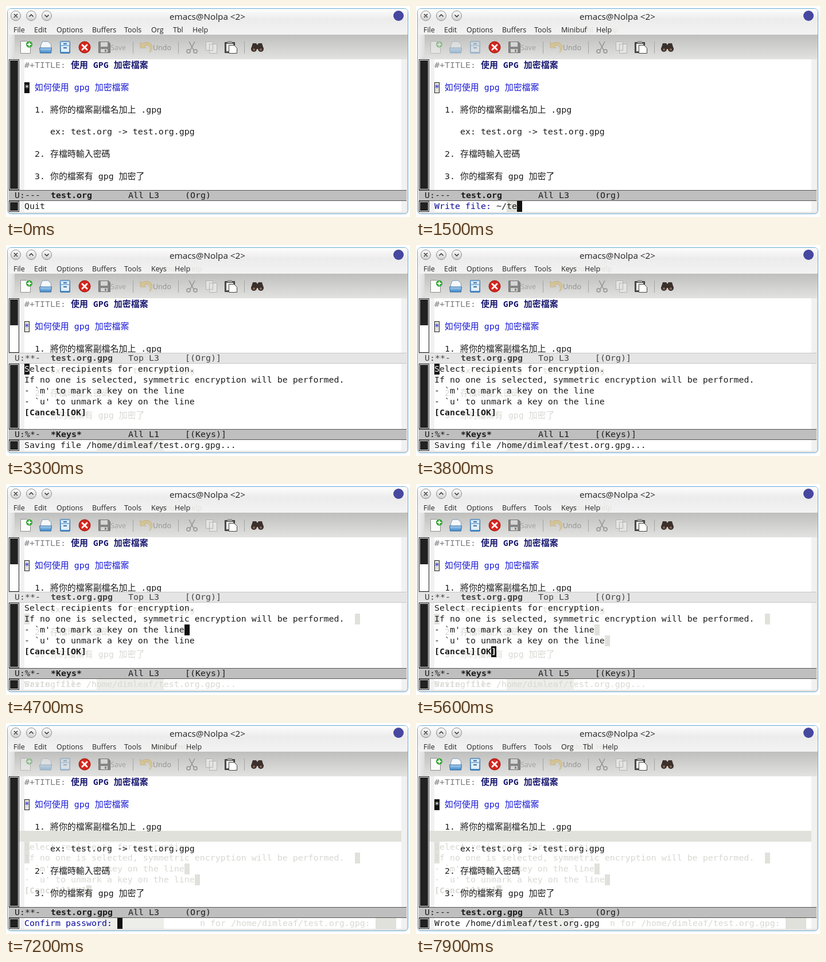
Animation of 704 by 368 pixels, one loop 8000 ms. Source, as an HTML page:

```html
<!DOCTYPE html>
<html lang="zh-Hant">
<head>
<meta charset="utf-8">
<title>GPG in Emacs</title>
<style>
html, body { margin: 0; width: 100%; height: 100%; overflow: hidden; background: #fff; }
svg { display: block; width: 704px; height: 368px; }
text { white-space: pre; }
.mono { font: 300 14.95px "DejaVu Sans Mono", "Noto Sans CJK TC", "Noto Sans CJK", monospace; fill: #1c1c1c; }
.ui { font: 12.5px "Open Sans", "Noto Sans", sans-serif; fill: #222; }
.b { font-weight: bold; }
.key { fill: #7f7f7f; }
.title { fill: #191970; font-weight: bold; }
.head { fill: #1a1ad6; }
.prompt { fill: #0c0c9c; }
.inv { fill: #fff; }
.idle { fill: #444; }
.old .mono { fill: #d8d8d3; }
.old .ui { fill: #e0e0db; }
</style>
</head>
<body>
<svg viewBox="0 0 704 368">
  <defs>
    <linearGradient id="bar" x2="0" y2="1">
      <stop offset="0" stop-color="#fdfdfd"/><stop offset=".4" stop-color="#ececec"/>
      <stop offset="1" stop-color="#f3f3f3"/>
    </linearGradient>
    <linearGradient id="tools" x2="0" y2="1">
      <stop offset="0" stop-color="#bfbfbd"/><stop offset="1" stop-color="#e2e2e0"/>
    </linearGradient>
    <linearGradient id="edge">
      <stop offset="0" stop-color="#f0f0f0"/><stop offset="1" stop-color="#dcdcdc"/>
    </linearGradient>
    <linearGradient id="knob" x2="0" y2="1">
      <stop offset="0" stop-color="#fff"/><stop offset="1" stop-color="#cfcfcf"/>
    </linearGradient>
    <linearGradient id="blue" x2="0" y2="1">
      <stop offset="0" stop-color="#a9d2f3"/><stop offset="1" stop-color="#3d83c4"/>
    </linearGradient>
  </defs>

  <rect x="2.5" y="4.5" width="698" height="358" rx="6" fill="#e4e4e4" stroke="#68acd6"/>
  <rect x="3" y="5" width="697" height="46" rx="5" fill="url(#bar)"/>
  <rect x="3" y="50" width="12" height="43" fill="url(#edge)"/>
  <rect x="15" y="50" width="685" height="43" fill="url(#tools)"/>

  <g fill="url(#knob)" stroke="#8c8c8c">
    <circle cx="17" cy="17" r="8.5"/><circle cx="44" cy="17" r="8.5"/><circle cx="71" cy="17" r="8.5"/>
  </g>
  <path d="M14 14l6 6m0-6l-6 6M40.5 18.5l3.5-3.5 3.5 3.5M67.5 15.5l3.5 3.5 3.5-3.5" fill="none" stroke="#333" stroke-width="1.5"/>
  <text class="ui" x="351" y="23.5" text-anchor="middle" style="font-size:15.25px">emacs@Nolpa &lt;2&gt;</text>
  <circle cx="684" cy="17" r="9" fill="#46479f"/>

  <g id="files">
    <path d="M25.5 61.5h11l6 6v15h-17z" fill="#fbfbfb" stroke="#8d8d8d"/>
    <circle cx="40.5" cy="67" r="5.5" fill="#35a335"/>
    <path d="M37 67h7m-3.5-3.5v7" stroke="#fff" stroke-width="2"/>
    <path d="M60.5 80v-11l3-7h10l5 5v13z" fill="#f5f8fb" stroke="#7f97ad"/>
    <path d="M58.5 73h21l-1 9h-19z" fill="url(#blue)" stroke="#346b9f"/>
    <rect x="94.5" y="61.5" width="17" height="21" rx="1.5" fill="url(#blue)" stroke="#4378a9"/>
    <path d="M96 64h14v4H96zM96 70h14v10H96z" fill="#e1effa"/>
    <path d="M100 66h6m-6 7h6" stroke="#3b6e9e" stroke-width="2"/>
  </g>
  <circle cx="137" cy="72" r="10" fill="#d5261d" stroke="#971009"/>
  <path d="M133 68l8 8m0-8l-8 8" stroke="#fff" stroke-width="3" stroke-linecap="round"/>
  <path d="M161.5 62.5h17l3 3v16h-20z" fill="#858585" stroke="#727272"/>
  <path d="M165 63h12v8h-12zM165 75h12v6h-12z" fill="#d5d5d5"/>
  <path d="M172 76h3v4h-3z" fill="#858585"/>
  <text class="ui" x="182" y="77" style="fill:#a2a2a2">Save</text>
  <g id="undo">
    <path d="M234 63v10h10l-3.5-3.5c6-3 11 0 11 8l-1.5 4c8-6 6-18-5-18-4 0-6 1-7.5 2.5z" fill="#e3b52a" stroke="#a8801a"/>
    <text class="ui" x="256" y="77" style="fill:#111">Undo</text>
  </g>
  <path d="M221.5 62v21M300.5 62v21M415.5 62v21" stroke="#a4a4a4"/>
  <g fill="none" stroke="#929292" stroke-width="1.5">
    <path d="M319 62l8 15M329 62l-8 15"/><circle cx="318" cy="79" r="3"/><circle cx="330" cy="79" r="3"/>
  </g>
  <g fill="#e4e4e3" stroke="#b4b4b2">
    <path d="M348.5 62.5h12v15h-12zM354.5 66.5h13v16h-13z"/>
  </g>
  <path d="M381.5 63.5h17v18h-17z" fill="#55554d" stroke="#333"/>
  <path d="M384 66h12v13h-12z" fill="#eee"/>
  <path d="M386 61h8v4h-8z" fill="#999"/>
  <path d="M388.5 68.5h9l5 5v9h-14z" fill="#fff" stroke="#444"/>
  <g fill="#3b302b">
    <path d="M430 65h6l2 3 2-3h6l3 10h-22z"/><circle cx="432" cy="75" r="5"/><circle cx="444" cy="75" r="5"/>
  </g>
  <g fill="#8b6a58"><circle cx="432" cy="76" r="2"/><circle cx="444" cy="76" r="2"/></g>

  <path d="M5 93h693v228H5zM5 340h693v19H5z" fill="#fff"/>
  <path d="M23 93h9v228h-9zM689 93h9v228h-9zM23 340h9v19h-9zM689 340h9v19h-9z" fill="#f1f1f1"/>
  <g id="live"></g>
</svg>
<script>
const LOOP = 8000, CELL = 9, LEFT = 32;
const USER = "/home/dimleaf/", FILE = "test.org.gpg";
const $ = id => document.getElementById(id);

const esc = s => s.replace(/&/g, "&amp;").replace(/</g, "&lt;").replace(/>/g, "&gt;");
const text = (x, y, s, cls = "") => `<text class="mono ${cls}" x="${x}" y="${y}">${esc(s)}</text>`;
const rect = (x, y, w, h, fill) => `<rect x="${x}" y="${y}" width="${w}" height="${h}" fill="${fill}"/>`;
const old = s => `<g class="old">${s}</g>`;
const PALE = "#e1e1dc";

const MENUS = {
  Org: [["Org", 253], ["Tbl", 291], ["Help", 325]],
  Minibuf: [["Minibuf", 253], ["Help", 314]],
  Keys: [["Keys", 253], ["Help", 294]]
};
const FIXED = [["File", 13], ["Edit", 49], ["Options", 88], ["Buffers", 150], ["Tools", 206]];
const labels = list => list.map(([s, x]) => `<text class="ui" x="${x}" y="46">${s}</text>`).join("");

const TAIL = [[224, "     ex: test.org -> test.org.gpg"], [263, "  2. 存檔時輸入密碼"], [302, "  3. 你的檔案有 gpg 加密了"]];
const tail = () => TAIL.map(([y, s]) => text(LEFT, y, s)).join("");

const KEYS = [
  "Select recipients for encryption.",
  "If no one is selected, symmetric encryption will be performed.",
  "- `m' to mark a key on the line",
  "- `u' to unmark a key on the line",
  "[Cancel][OK]"
];
const keyY = row => 221 + 19 * row;
const keyLines = () => KEYS.map((s, i) => text(LEFT, keyY(i), s, i == 4 ? "b" : "")).join("");
const keyCell = ([row, col], fill) => rect(LEFT + col * CELL, keyY(row) - 14, CELL, 19, fill);
// Places the cursor visits in the key list: row, column
const WALK = [[0, 0], [1, 0], [1, 64], [2, 31], [3, 33], [4, 12], [4, 11]];

function scrollbar(y, h, fill = h - 4) {
  return `<rect x="5.5" y="${y + .5}" width="17" height="${h - 1}" fill="#fff" stroke="#222"/>` +
    rect(7, y + 2, 14, fill, "#222");
}

function modeline(y, flags, name, place, mode, idle) {
  const cls = idle ? "idle" : "";
  return rect(5, y, 693, 19, idle ? "#e5e5e5" : "#bfbfbf") +
    `<path d="M5 ${y + .5}H698M5 ${y + 18.5}H698" stroke="${idle ? "#c6c6c6" : "#555"}"/>` +
    text(15, y + 14, "U:" + flags, cls) + text(78, y + 14, name, cls + " b") +
    text(213, y + 14, place, cls) + text(312, y + 14, mode, cls);
}

function orgBuffer(active) {
  const star = active ? rect(32, 133, 9, 19, "#111") + text(LEFT, 147, "*", "inv")
    : `<rect x="32.5" y="133.5" width="8" height="18" fill="${PALE}" stroke="#222"/>` + text(LEFT, 147, "*", "head");
  return text(LEFT, 108, "#+TITLE:", "key") + text(113, 108, "使用 GPG 加密檔案", "title") +
    star + text(50, 147, "如何使用 gpg 加密檔案", "head") + text(LEFT, 186, "  1. 將你的檔案副檔名加上 .gpg");
}

function minibuffer({ prompt = "", input = "" }) {
  const x = LEFT + prompt.length * CELL, end = x + input.length * CELL;
  return text(LEFT, 354, prompt, "prompt") + text(x, 354, input) +
    (prompt ? rect(end, 340, CELL, 19, "#111") : "");
}

const WRITE = { prompt: "Write file: ", input: "~/" };
const PASS = { prompt: `Passphrase for symmetric encryption for ${USER}${FILE}: `, input: "" };
const AGAIN = { prompt: "Confirm password: ", input: "" };
const SAVING = { input: `Saving file ${USER}${FILE}...` };
const typed = (mini, s) => ({ mini: { ...mini, input: mini.input + s } });
const typing = (mini, s, times) => times.map((t, i) => [t, typed(mini, s.slice(0, i + 1))]);

const steps = [
  [0, { menu: "Org", mini: { input: "Quit" }, view: "plain", name: "test.org", flags: "---" }],
  [600, { menu: "Minibuf", past: "Org", mini: WRITE }],
  ...typing(WRITE, FILE, [1400, 1500, 1700, 1800, 1900, 2000, 2200, 2300, 2600, 2800, 2900, 3000]),
  [3300, { menu: "Keys", past: "Minibuf", mini: SAVING, view: "keys", name: FILE, flags: "**-", walk: 0 }],
  [4200, { walk: 1, mini: {} }],
  ...[4400, 4700, 4900, 5100, 5300].map((t, i) => [t, { walk: i + 2 }]),
  [5900, { menu: "Minibuf", past: "Keys", view: "after", mini: PASS }],
  ...typing(PASS, "...", [6600, 6800, 7000]),
  [7200, { mini: AGAIN }],
  ...typing(AGAIN, "...", [7400, 7500, 7600]),
  [7800, { menu: "Org", past: "Minibuf", flags: "---", mini: { input: `Wrote ${USER}${FILE}` } }]
];

function stateAt(t) {
  return Object.assign({}, ...steps.filter(([at]) => at <= t).map(([, s]) => s));
}

// Pale remains of earlier minibuffer text
function residue(s, t) {
  if (s.view == "plain") {
    return s.mini.prompt ? rect(158, 340, (s.mini.input.length - 2) * CELL, 19, PALE) : "";
  }
  const trail = rect(158, 340, 117, 19, "#ededea");
  if (t < 4200) return trail;
  if (t < 7200) return trail + old(text(LEFT, 354, SAVING.input) + text(LEFT, 354, WRITE.prompt));
  const cut = 34;
  return trail + old(text(LEFT + cut * CELL, 354, PASS.prompt.slice(cut))) + rect(644, 340, 36, 19, PALE);
}

function render(t) {
  const s = stateAt(t), inMini = s.menu == "Minibuf", split = s.view == "keys";
  $("files").style.opacity = inMini ? .4 : 1;
  $("undo").style.opacity = t >= 2000 && t < 3300 ? 1 : .35;

  let out = (s.past ? old(labels(MENUS[s.past])) : "") + labels(FIXED) + labels(MENUS[s.menu]);
  if (s.view == "after") {
    out += rect(23, 188, 666, 19, PALE) + WALK.slice(0, 6).map(c => keyCell(c, PALE)).join("") + old(keyLines());
  }
  out += orgBuffer(s.menu == "Org");
  if (split) {
    const [row, col] = WALK[s.walk], cell = KEYS[row][col] || "";
    out += old(tail()) + WALK.slice(1, Math.min(s.walk, 5)).map(c => keyCell(c, PALE)).join("") + keyLines() +
      keyCell(WALK[s.walk], "#111") + text(LEFT + col * CELL, keyY(row), cell, row == 4 ? "inv b" : "inv") +
      scrollbar(93, 95, 45) + scrollbar(207, 114) +
      modeline(188, s.flags, s.name, "Top L3", "[(Org)]", true) +
      modeline(321, "%*-", "*Keys*", "All L" + (row + 1), "[(Keys)]");
  } else {
    out += tail() + scrollbar(93, 228) + modeline(321, s.flags, s.name, "All L3", "(Org)");
  }
  $("live").innerHTML = out + residue(s, t) + scrollbar(340, 19) + minibuffer(s.mini);
}

const start = performance.now();
let shown = -1;
function tick() {
  const t = Math.floor(Math.max(0, performance.now() - start) % LOOP / 100) * 100;
  if (t != shown) render(shown = t);
  requestAnimationFrame(tick);
}
tick();
</script>
</body>
</html>
```
